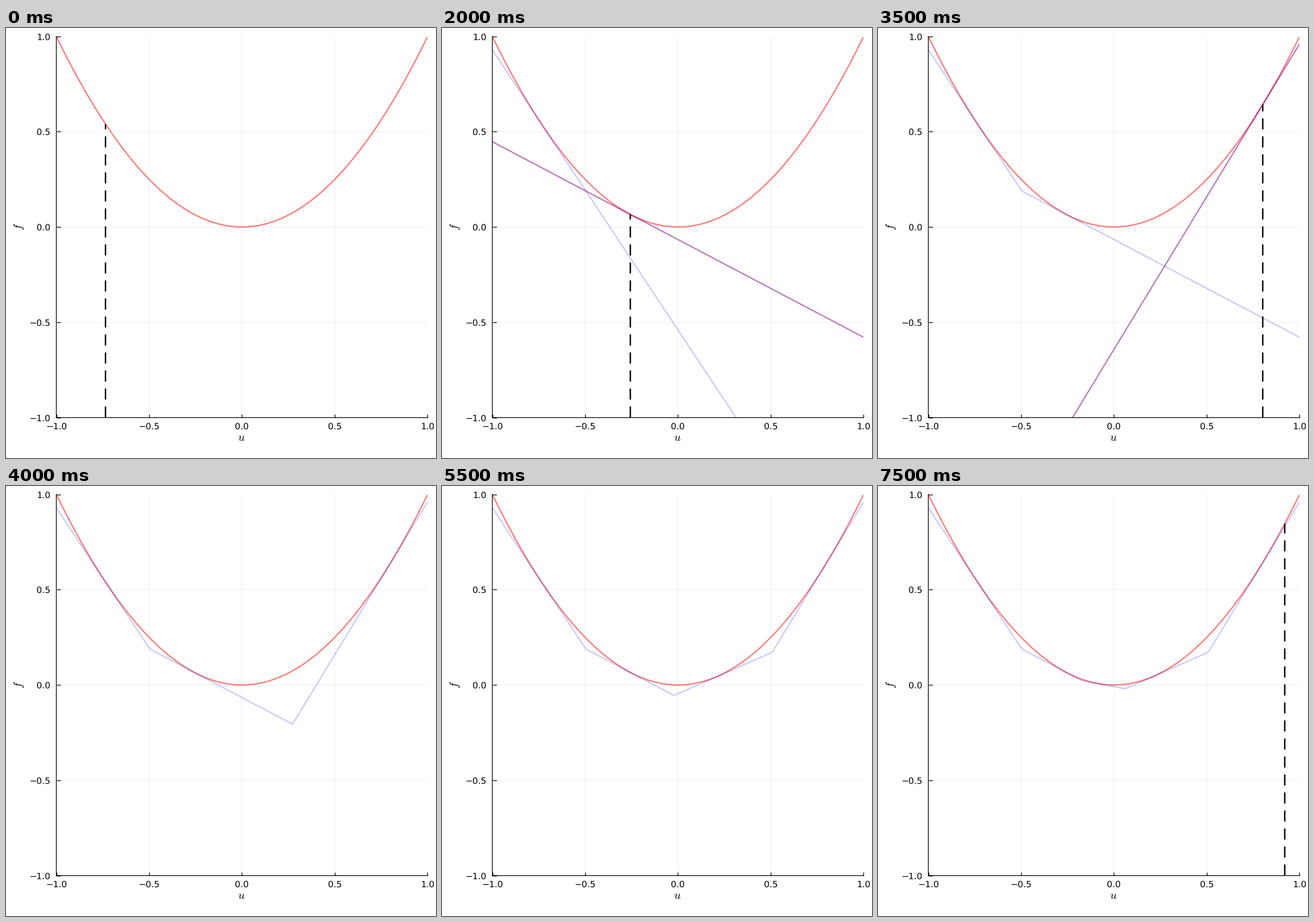
Recreate the animation shown at these times as a matplotlib script. Size 748 by 748 pixels, loop 8000 ms.

```python
import numpy as np
import matplotlib.pyplot as plt
from matplotlib.animation import FuncAnimation

SIZE, DPI = 748, 100
PX = 72 / DPI  # points per pixel
LEFT, RIGHT, TOP, BOTTOM = 87.5, 733.4, 14.6, 677.7
CUTS = [-0.735, -0.2565, 0.8015, 0.214, -0.0945, 0.92]
STEPS, INTERVAL = 16, 500

plt.rcParams.update({
    "font.family": "DejaVu Sans",
    "font.size": 15.3 * PX,
    "mathtext.fontset": "cm",
    "text.hinting": "none",
    "path.snap": False,
})

u = np.linspace(-1, 1, 201)


def tangent(p):
    return 2 * p * u - p * p


fig = plt.figure(figsize=(SIZE / DPI, SIZE / DPI), dpi=DPI, facecolor="white")
ax = fig.add_axes([LEFT / SIZE, 1 - BOTTOM / SIZE,
                   (RIGHT - LEFT) / SIZE, (BOTTOM - TOP) / SIZE])
ax.set(xlim=(-1, 1), ylim=(-1, 1))
ticks = np.linspace(-1, 1, 5)
ax.set_xticks(ticks)
ax.set_yticks(ticks)
ax.set_axisbelow(True)
ax.grid(color="black", alpha=0.06, lw=1.2 * PX)
ax.tick_params(direction="in", length=6.5 * PX, width=1.25 * PX)
ax.tick_params(axis="x", pad=8.3 * PX)
ax.tick_params(axis="y", pad=10 * PX)
ax.spines[["top", "right"]].set_visible(False)
ax.spines[["left", "bottom"]].set_linewidth(1.25 * PX)


def label(x, y, text, **kw):
    fig.text(x / SIZE, 1 - y / SIZE, text, size=20 * PX,
             ha="center", va="center", **kw)


label(409.7, 713.7, "$u$")
label(23, 345.7, "$f$", rotation=90)

width = 2.41 * PX
ax.plot(u, u**2, color="red", alpha=0.5, lw=width)
bound, = ax.plot([], [], color="blue", alpha=0.2, lw=width)
slope, = ax.plot([], [], color="purple", alpha=0.5, lw=width)
probe, = ax.plot([], [], color="black", lw=width, ls=(0, (8, 5)))


def draw(i):
    # Each cut takes three steps: probe, tangent, merge into the bound.
    n, phase = divmod(i, 3)
    p = CUTS[n]
    merged = CUTS[:n + (phase == 2)]
    if merged:
        bound.set_data(u, np.max([tangent(c) for c in merged], axis=0))
    else:
        bound.set_data([], [])
    slope.set_data(u, tangent(p))
    slope.set_visible(phase == 1)
    probe.set_data([p, p], [-1, p * p])
    probe.set_visible(phase < 2)
    return bound, slope, probe


anim = FuncAnimation(fig, draw, frames=STEPS, interval=INTERVAL,
                     repeat=True, repeat_delay=0)
plt.show()
```
